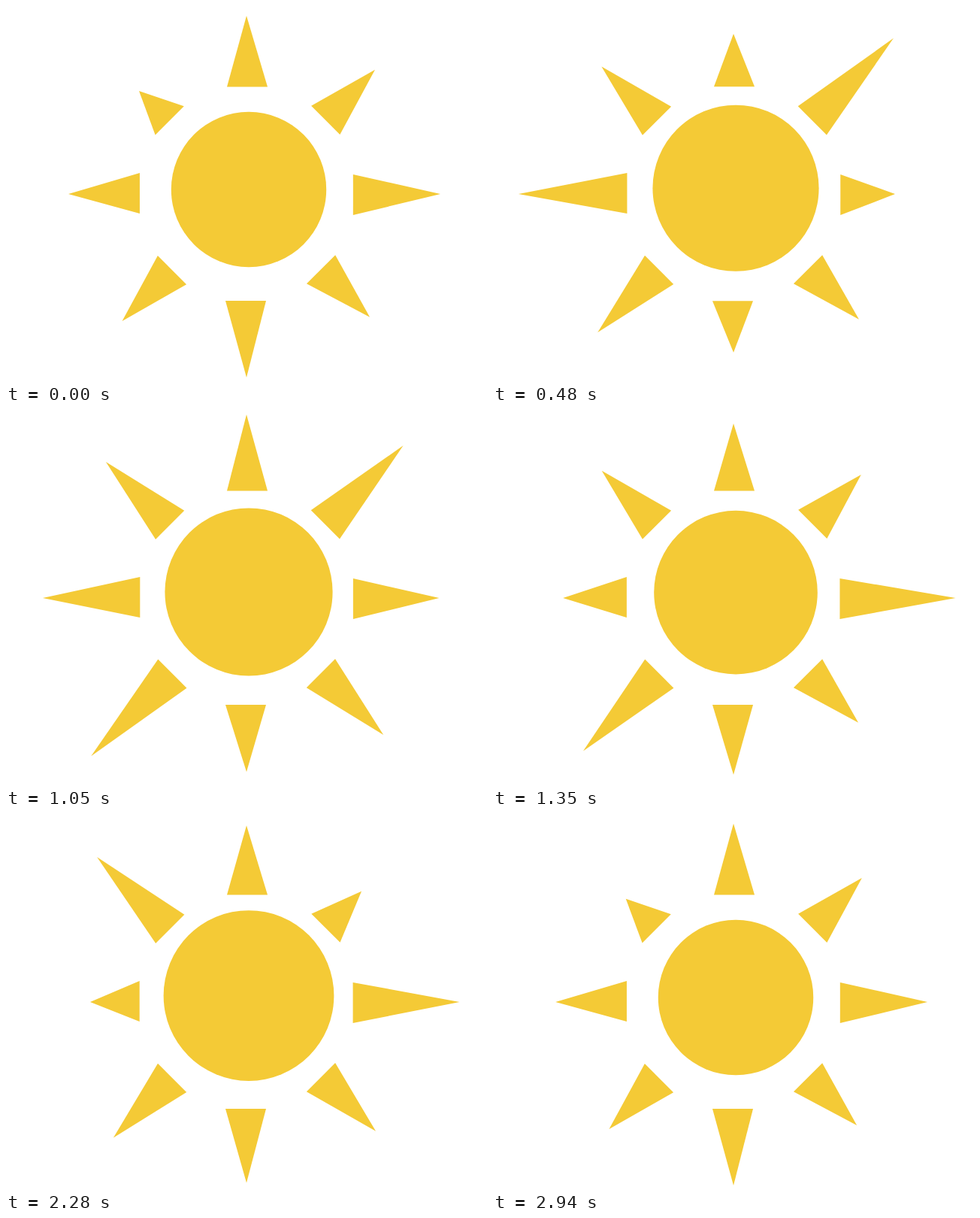
Recreate the animation shown at these times as an HTML page. Size 640 by 500 pixels, loop 2970 ms.

```html
<!DOCTYPE html>
<html>
<head>
<meta charset="utf-8">
<style>
  html, body { margin: 0; width: 100%; height: 100%; overflow: hidden; background: #fff; }
  svg { display: block; fill: #f4ca36; }
</style>
</head>
<body>
<svg width="640" height="500" viewBox="0 0 640 500"><circle cx="323"/></svg>
<script>
const LOOP = 2970;
const svg = document.querySelector('svg');
const disc = document.querySelector('circle');

// Clockwise from the top: middle of the base, then [time, length] at each turning point.
const rays = [
  { at: [321, 107.5], keys: [[0, 94.5], [480, 70.5], [1060, 101.5], [1930, 55.5], [2510, 111.5]] },
  { at: [425.2, 152], keys: [[0, 94], [750, 178], [1610, 68.5], [2250, 68.5]] },
  { at: [462, 251], keys: [[0, 116], [570, 70], [1590, 167]] },
  { at: [419, 350.2], keys: [[0, 91], [300, 77], [750, 128], [1770, 74], [2370, 104]] },
  { at: [319, 392], keys: [[0, 102], [710, 58], [1200, 98], [1890, 57], [2450, 110]] },
  { at: [221, 351], keys: [[0, 95], [1200, 156], [1770, 86], [2350, 112.5]] },
  { at: [178, 249], keys: [[0, 95], [750, 164.5], [1410, 83], [1770, 116], [2350, 64]] },
  { at: [218, 152.7], keys: [[0, 57], [800, 128], [1480, 100], [2250, 136.5]] }
];

rays.forEach((ray, i) => {
  ray.shape = document.createElementNS(svg.namespaceURI, 'polygon');
  ray.shape.setAttribute('transform', `translate(${ray.at}) rotate(${45 * i})`);
  svg.append(ray.shape);
});

const ease = p => p * p * (3 - 2 * p);

// Eases from key to key, and from the last one back to the first.
function valueAt(keys, t) {
  const i = keys.findLastIndex(key => key[0] <= t);
  const [t0, v0] = keys[i];
  const [t1, v1] = keys[i + 1] || [LOOP, keys[0][1]];
  return v0 + (v1 - v0) * ease((t - t0) / (t1 - t0));
}

// Two pulses per loop, the dip between them only half as deep.
function discScale(t) {
  const quarter = 4 * t / LOOP;
  const swell = ease(1 - Math.abs(quarter % 2 - 1));
  const inner = quarter > 1 && quarter < 3;
  return inner ? 1.05 + 0.05 * swell : 1 + 0.1 * swell;
}

function draw(t) {
  for (const { shape, keys } of rays) {
    const len = valueAt(keys, t);
    const foot = len / 100 - 1; // the base drifts slightly as the ray stretches
    shape.setAttribute('points', `-27,${foot} 27,${foot} -1,${-len}`);
  }
  const s = discScale(t);
  disc.setAttribute('cy', 244 - 25 * (s - 1));
  disc.setAttribute('r', 103.2 * s);
}

const start = performance.now();
function frame() {
  draw((performance.now() - start) % LOOP);
  requestAnimationFrame(frame);
}
frame();
</script>
</body>
</html>
```
